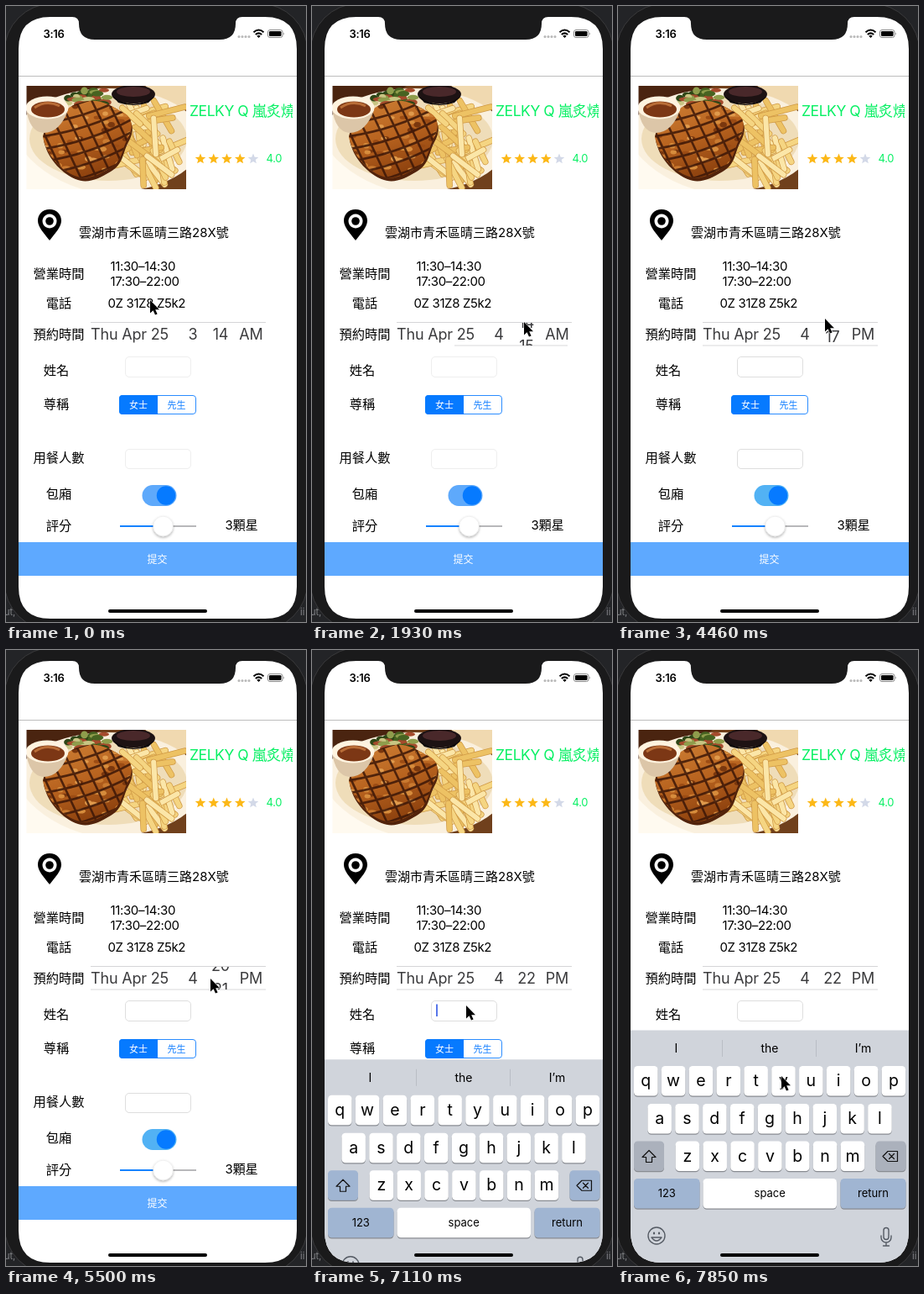
Write an HTML page that moves like this. It is 358 by 733 pixels and loops after 7990 ms.

```html
<!DOCTYPE html>
<html lang="zh-Hant">
<head>
<meta charset="utf-8">
<title>Booking form</title>
<style>
html, body { margin: 0; width: 100%; height: 100%; overflow: hidden; background: #232427; }
svg { display: block; width: 100%; height: 100%; }
text { font-family: Inter, "Noto Sans CJK TC", "Noto Sans CJK", sans-serif; font-size: 15px; white-space: pre; }
.latin { letter-spacing: -.025em; }
.wheel text { font-size: 18px; fill: #3b3b3d; letter-spacing: -.01em; }
.mid { text-anchor: middle; }
</style>
</head>
<body>
<svg viewBox="0 0 358 733" xmlns="http://www.w3.org/2000/svg">
  <defs>
    <clipPath id="screenClip"><path d="M53 13H79Q87 13 87 21Q87 40 106 40H255Q274 40 274 21Q274 13 282 13H309Q347 13 347 51V691Q347 729 309 729H53Q15 729 15 691V51Q15 13 53 13Z"/></clipPath>
    <clipPath id="photoClip"><rect x="24.500" y="95" width="190.500" height="123"/></clipPath>
    <clipPath id="titleClip"><rect x="219" y="110" width="123" height="30"/></clipPath>
    <clipPath id="wheelClip"><rect x="100" y="377" width="212" height="27"/></clipPath>
    <clipPath id="steakClip"><path id="steakShape" d="M45 160C41 148 56 139 68 127C79 116 97 110 113 114C124 117 131 122 142 128C154 136 150 150 144 160C138 172 139 184 124 193C109 202 96 208 82 202C67 196 50 179 45 160Z"/></clipPath>
    <linearGradient id="steakFill" x1="0" y1="0" x2=".4" y2="1">
      <stop offset="0" stop-color="#cf8136"/><stop offset=".55" stop-color="#b8631f"/><stop offset="1" stop-color="#8f430f"/>
    </linearGradient>
    <filter id="soft" x="-50%" y="-50%" width="200%" height="200%"><feDropShadow dx="0" dy="1.500" stdDeviation="1.500" flood-opacity=".32"/></filter>
    <filter id="blur"><feGaussianBlur stdDeviation=".7"/></filter>
  </defs>

  <rect width="358" height="733" fill="#232427"/>
  <rect x="-2" y="-3" width="362" height="746" rx="58" fill="#1a1a1b" stroke="#3a3a3c"/>
  <text x="-2" y="725" style="font-size:11px" fill="#85868a">ut,</text>
  <text x="351" y="725" style="font-size:11px" fill="#85868a">ii</text>

  <g clip-path="url(#screenClip)">
    <rect x="15" y="13" width="332" height="716" fill="#fff"/>
    <g id="status">
      <text class="mid latin" x="57" y="37.500" style="font-size:13px;font-weight:600">3:16</text>
      <g fill="#b9b9b9"><circle cx="278" cy="36.500" r="1.500"/><circle cx="282" cy="36.500" r="1.500"/><circle cx="286" cy="36.500" r="1.500"/><circle cx="290" cy="36.500" r="1.500"/></g>
      <g fill="none" stroke="#000" stroke-width="2"><path d="M295.500 31.300Q301.500 25.800 307.500 31.300M297.800 34Q301.500 30.700 305.200 34"/></g>
      <path d="M299.300 35.700Q301.500 33.900 303.700 35.700L301.500 38Z"/>
      <rect x="312.500" y="28.500" width="17.500" height="9" rx="2.500" fill="none" stroke="#888"/>
      <rect x="314" y="30" width="14.500" height="6" rx="1.300"/><path d="M331.300 31.500q1.800 1.500 0 3z" fill="#777"/>
    </g>
    <path d="M15 83.500H347" stroke="#bdbdbd"/>

    <g clip-path="url(#photoClip)"><g filter="url(#blur)">
      <rect x="20" y="90" width="200" height="134" fill="#70401c"/>
      <path d="M20 90H120L70 125L20 140Z" fill="#4a2410"/>
      <path d="M165 90H220V124L172 112Z" fill="#f0d9b0"/>
      <ellipse cx="122" cy="160" rx="112" ry="62" fill="#faf0de"/>
      <path d="M20 172Q52 212 115 224H20Z" fill="#fffaf0"/>
      <ellipse cx="122" cy="158" rx="94" ry="50" fill="#efddb9"/>
      <g id="greens"></g>
      <g id="fries" stroke-linecap="round"></g>
      <ellipse cx="152" cy="105" rx="26" ry="11" fill="#1d1213"/>
      <ellipse cx="152" cy="102" rx="20" ry="6" fill="#49282a"/>
      <path d="M127 107Q152 126 178 107L170 115Q152 121 134 115Z" fill="#0f0a0c"/>
      <use href="#steakShape" fill="#52230b" x="1" y="4"/>
      <use href="#steakShape" fill="url(#steakFill)"/>
      <g clip-path="url(#steakClip)">
        <g id="sear"></g>
        <path id="grill" fill="none" stroke="#3c1708" stroke-width="2.600" opacity=".85"/>
      </g>
      <path d="M24 122Q28 150 45 151Q64 151 74 124Z" fill="#dcc6a8"/>
      <ellipse cx="49" cy="121" rx="25.500" ry="13.500" fill="#fff3df"/>
      <ellipse cx="50" cy="123" rx="20" ry="9.500" fill="#7c3715"/>
      <path d="M34 121Q48 111 64 119" fill="none" stroke="#b96d37" stroke-width="3"/>
    </g></g>

    <g clip-path="url(#titleClip)"><text x="219" y="131" fill="#08f064" style="font-size:17.500px;letter-spacing:-.025em">ZELKY Q 嵐炙燒</text></g>
    <g id="stars"></g>
    <text class="latin" x="310.500" y="186" fill="#08f064" style="font-size:13px">4.0</text>
    <path fill-rule="evenodd" d="M52 242C43.500 242 38 248 38 255.500C38 263 45 270 52 279C59 270 66 263 66 255.500C66 248 60.500 242 52 242ZM52 247.500a8.500 8.500 0 1 0 .01 0Z"/>
    <circle cx="52" cy="256" r="4.800"/>

    <g id="labels"></g>
    <path d="M101 376.500H310" stroke="#d5d5d7"/>
    <path id="lowerLine" stroke="#d8d8da"/>
    <g class="wheel" clip-path="url(#wheelClip)">
      <text x="101" y="397">Thu Apr 25</text>
      <g id="hour"></g><g id="minute"></g><g id="half"></g>
    </g>

    <g id="fields" fill="#fff" stroke="#d9d9d9">
      <rect x="142.500" y="417.500" width="78" height="24" rx="4.500"/>
      <rect x="142.500" y="527.500" width="78" height="23" rx="4.500"/>
    </g>
    <path id="caret" d="M149 421.500V436" stroke="#4668e8" stroke-width="1.800"/>
    <rect x="135.500" y="463.500" width="91" height="22" rx="3.500" fill="#fff" stroke="#2a8cff"/>
    <path d="M181 463V486H139q-4 0-4-4V467q0-4 4-4Z" fill="#067aff"/>
    <text class="mid" x="158" y="479" fill="#fff" style="font-size:11px">女士</text>
    <text class="mid" x="203.500" y="479" fill="#147fff" style="font-size:11px">先生</text>

    <rect id="track" x="162.500" y="570" width="41" height="25" rx="12.500"/>
    <circle cx="191" cy="582.500" r="11.200" fill="#067aff"/>
    <path d="M136 619H188" stroke="#1683ff" stroke-width="2"/>
    <path d="M188 619H227" stroke="#b8b8ba" stroke-width="2"/>
    <circle cx="187.500" cy="619" r="11.800" fill="#fff" stroke="#e4e4e4" stroke-width=".5" filter="url(#soft)"/>
    <rect x="15" y="638" width="332" height="40" fill="#5ea9ff"/>
    <text class="mid" x="180.500" y="662.500" fill="#fff" style="font-size:12px">提交</text>

    <g id="keyboard"></g>
    <rect x="122" y="718" width="118" height="4" rx="2"/>
  </g>
  <path id="pointer" d="M0 0V15.500L3.600 12.200L6 17.600L8.600 16.500L6.200 11.200H11Z" stroke="#fff" stroke-width="1" paint-order="stroke" stroke-linejoin="round"/>
</svg>
<script>
const $ = id => document.getElementById(id);

function add(parent, tag, attrs, content) {
  const el = document.createElementNS("http://www.w3.org/2000/svg", tag);
  for (const name in attrs) el.setAttribute(name, attrs[name]);
  if (content !== undefined) el.textContent = content;
  return parent.appendChild(el);
}

let seed = 7;
const random = () => (seed = seed * 16807 % 2147483647) / 2147483647;
const pick = list => list[Math.floor(random() * list.length)];

// Food picture
function scatter(id, count, [left, top, width, height], size, colors) {
  for (let i = 0; i < count; i++) {
    add($(id), "ellipse", {
      cx: left + random() * width, cy: top + random() * height,
      rx: size + random() * size, ry: size * .6 + random() * size * .5, fill: pick(colors)
    });
  }
}
scatter("greens", 34, [74, 98, 48, 19], 4, ["#476321", "#8f9d4c", "#2e4616", "#c8c583", "#a54b2c"]);
scatter("sear", 60, [45, 112, 105, 92], 3, ["#e09a4c", "#9c4c14", "#c97a30", "#7a370e", "#d68c3c"]);
for (let i = 0; i < 44; i++) {
  const x = 142 + random() * 60, y = 124 + random() * 76;
  const angle = pick([.55, .9, 1.2, -.5]) + random() * .35, half = 13 + random() * 10;
  const dx = Math.cos(angle) * half, dy = Math.sin(angle) * half;
  const line = { x1: x - dx, y1: y - dy, x2: x + dx, y2: y + dy };
  add($("fries"), "line", { ...line, stroke: "#d09a45", "stroke-width": 7.5 });
  add($("fries"), "line", { ...line, stroke: pick(["#f5d582", "#fbe6a8", "#edc264"]), "stroke-width": 6 });
}
let grill = "";
for (let i = 0; i < 7; i++) {
  grill += `M${24 + i * 19} 108q20 40 46 96M38 ${126 + i * 15}q60 -8 112 -36`;
}
$("grill").setAttribute("d", grill);

// Rating and labels
for (let i = 0; i < 5; i++) {
  const points = Array.from({ length: 10 }, (_, k) => {
    const r = k % 2 ? 2.9 : 6.6, a = k * Math.PI / 5;
    return [232 + i * 15.75 + r * Math.sin(a), 182 - r * Math.cos(a)];
  });
  add($("stars"), "polygon", { points: points.join(" "), fill: i < 4 ? "#fcb817" : "#d3d9e8" });
}
[["營業時間", 63, 318], ["電話", 63, 353], ["預約時間", 63, 390.5], ["姓名", 60, 433],
 ["尊稱", 60, 473], ["用餐人數", 63, 537], ["包廂", 63, 580], ["評分", 63, 618]
].forEach(([label, x, y]) => add($("labels"), "text", { class: "mid", x, y: y + 5.5, style: "font-size:15.25px" }, label));
[["雲湖市青禾區晴三路28X號", 87, 274.5], ["11:30–14:30", 124.5, 314.5], ["17:30–22:00", 124.5, 332.5],
 ["0Z 31Z8 Z5k2", 121.5, 358.5], ["3顆星", 261.5, 623]
].forEach(([label, x, y]) => add($("labels"), "text", { x, y, class: /^[01]/.test(label) ? "latin" : "" }, label));

// Picker wheels
const rowHeight = 28;
function wheel(id, x, values) {
  values.forEach((value, i) => add($(id), "text", { class: "mid", x, y: 397 + i * rowHeight }, value));
}
wheel("hour", 223, [3, 4, 5]);
wheel("minute", 256, Array.from({ length: 10 }, (_, i) => 14 + i));
wheel("half", 292.5, ["AM", "PM"]);

// Keyboard, laid out in its resting place
const keyboard = $("keyboard");
const special = [];
add(keyboard, "rect", { x: 15, y: 452.5, width: 332, height: 300, fill: "#d0d4db" });
function key(x, y, width, label, size, fill = "#fff") {
  add(keyboard, "rect", { x, y: y + 1.2, width, height: 35.5, rx: 4.5, fill: "#898c92" });
  const face = add(keyboard, "rect", { x, y, width, height: 35.5, rx: 4.5, fill });
  add(keyboard, "text", { class: "mid", x: x + width / 2, y: y + 18 + size * .32, style: `font-size:${size}px` }, label);
  return face;
}
["I", "the", "I’m"].forEach((word, i) =>
  add(keyboard, "text", { class: "mid", x: 69.5 + i * 111.5, y: 479, style: "font-size:14px" }, word));
add(keyboard, "path", { d: "M124.500 464v20M236.500 464v20", stroke: "#b9bdc5" });
[["qwertyuiop", 19, 495], ["asdfghjkl", 35.4, 540], ["zxcvbnm", 68.6, 584.5]].forEach(([row, left, y]) =>
  [...row].forEach((letter, i) => key(left + i * 32.85, y, 28.5, letter, 19.5)));
const blueKey = "#a0b5d2";
special.push(key(19, 584.5, 36, "", 12), key(307.5, 584.5, 36, "", 12));
key(19, 629, 78.5, "123", 13, blueKey);
key(101.5, 629, 159.5, "space", 13);
key(265.5, 629, 78, "return", 13, blueKey);
const stroke = (d, color, width) => add(keyboard, "path", {
  d, fill: "none", stroke: color, "stroke-width": width, "stroke-linejoin": "round", "stroke-linecap": "round"
});
stroke("M37 595.500l8 8h-4.500v6h-7v-6h-4.500z", "#111", 1.2);
stroke("M322 596.500h11.500v12h-11.500l-6-6zM323.500 599.500l6 6m0-6l-6 6", "#111", 1.2);
stroke("M56 697a10 10 0 1 1-20 0a10 10 0 1 1 20 0M40 699q6 8 12 0z", "#555b64", 1.4);
stroke("M43 693.500v1M49 693.500v1", "#555b64", 2.2);
stroke("M317 690.500a3 3 0 0 1 6 0v8a3 3 0 0 1-6 0zM314 697v2a6 6 0 0 0 12 0v-2M320 705v4M316.500 709h7", "#555b64", 1.4);

// Motion tables: [step, value, ...]
const pointerPath = [
  [0, 172, 350], [2, 184, 362], [5, 222, 394], [7, 223, 388], [8, 222, 388], [10, 223, 354], [12, 251, 392],
  [14, 255, 360], [16, 284, 388], [17, 288, 384], [19, 292, 357], [20, 288, 362], [22, 254, 392],
  [25, 249, 362], [27, 248, 393], [30, 247, 372], [31, 248, 381], [33, 250, 393], [35, 252, 384],
  [37, 244, 391], [39, 219, 393], [42, 196, 414], [45, 184, 423], [48, 184, 423], [50, 187, 448], [53, 195, 507]
];
const wheels = {
  hour: [[8, 0], [10, 1]],
  minute: [[12, 0], [14, 1], [22, 1], [25, 2], [28, 2], [30, 2.9], [31, 3], [33, 3.6], [36, 6], [39, 7.6], [41, 8]],
  half: [[16, 0], [18, 1]]
};

function at(table, step) {
  const next = table.findIndex(row => row[0] > step);
  if (next === 0) return table[0].slice(1);
  if (next < 0) return table[table.length - 1].slice(1);
  const a = table[next - 1], b = table[next], k = (step - a[0]) / (b[0] - a[0]);
  return a.slice(1).map((v, i) => v + (b[i + 1] - v) * k);
}

const loopMs = 7990, stepMs = 148;

function draw(time) {
  const step = Math.floor(time % loopMs / stepMs);
  const [x, y] = at(pointerPath, step);
  $("pointer").setAttribute("transform", `translate(${x} ${y})`);
  for (const id in wheels) {
    $(id).setAttribute("transform", `translate(0 ${-at(wheels[id], step)[0] * rowHeight})`);
  }
  const [from, to] = step < 5 ? [101, 101] : step < 12 ? [176, 235] : step < 27 ? [170, 305] : [101, 310];
  $("lowerLine").setAttribute("d", `M${from} 404H${to}`);

  const refreshed = step >= 27;
  $("track").setAttribute("fill", refreshed ? "#52b2f4" : "#5ea9fb");
  $("fields").setAttribute("stroke", refreshed ? "#dedede" : "#eeeeee");

  // Critically damped slide
  const open = step >= 47;
  const u = 3.6 + 2.7 * (step - 48);
  const drop = open ? 276.5 * (1 + u) * Math.exp(-u) : 300;
  keyboard.setAttribute("transform", `translate(0 ${drop})`);
  keyboard.setAttribute("visibility", open ? "visible" : "hidden");
  special.forEach(face => face.setAttribute("fill", step > 48 ? "#abb1bc" : blueKey));
  $("caret").setAttribute("visibility", open && step < 51 ? "visible" : "hidden");
}

const start = performance.now();
function tick() {
  draw(performance.now() - start);
  requestAnimationFrame(tick);
}
tick();
</script>
</body>
</html>
```
